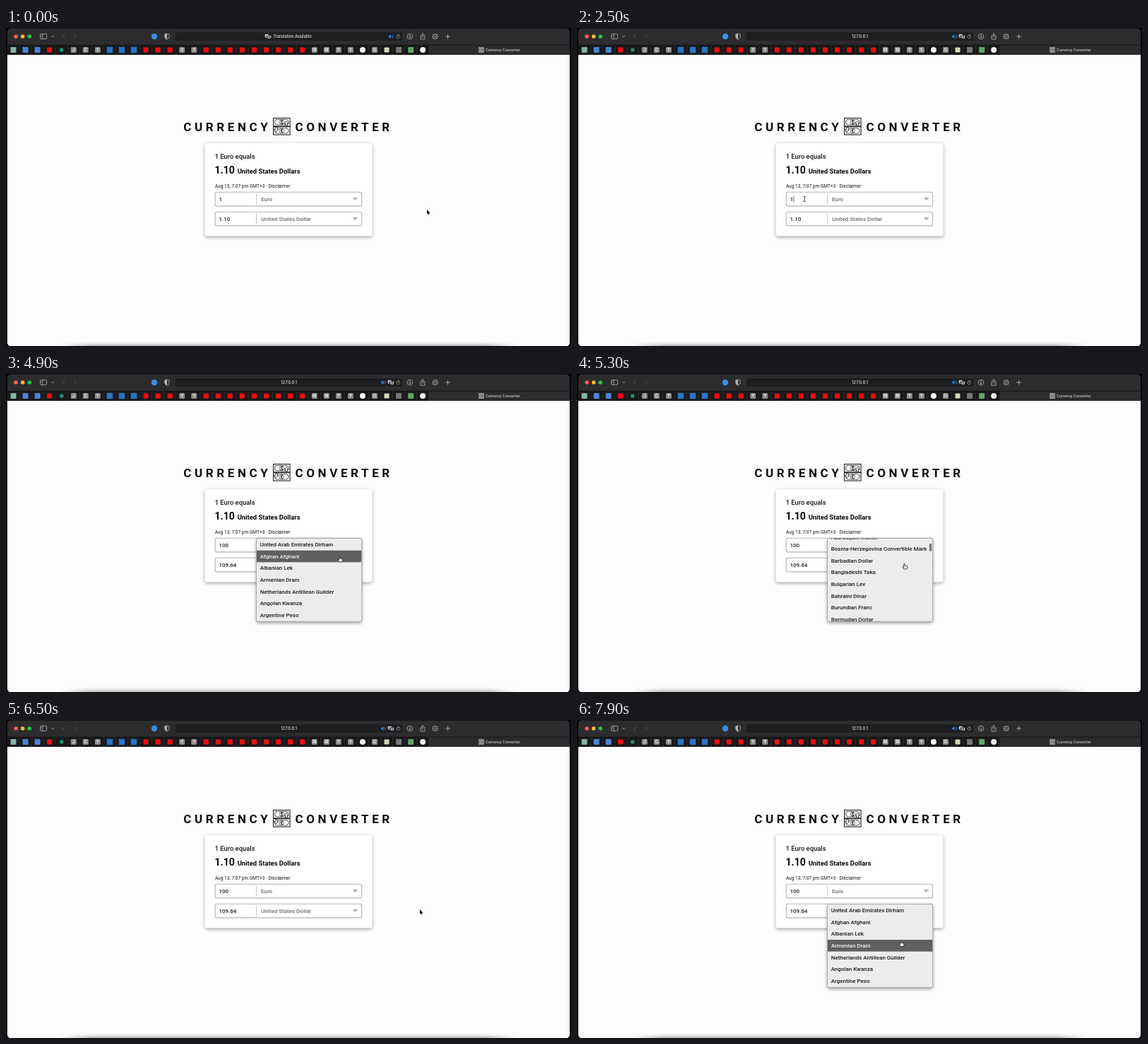
These frames come from a looping animation (800 px wide and 450 px high, 8000 ms). An HTML page with a canvas:

```html
<!DOCTYPE html>
<html lang="en">
<head>
<meta charset="utf-8">
<title>Currency Converter</title>
<style>
html, body { margin: 0; width: 100%; height: 100%; overflow: hidden; background: #000; }
canvas { display: block; width: 800px; height: 450px; }
</style>
</head>
<body>
<canvas id="stage"></canvas>
<script>
const canvas = document.getElementById('stage');
const ctx = canvas.getContext('2d');
const ratio = window.devicePixelRatio || 1;
canvas.width = 800 * ratio;
canvas.height = 450 * ratio;

const LOOP = 8000, STEP = 100, ROW = 16.6;
const WEB = 'Roboto, sans-serif', UI = 'Inter, sans-serif';

const CURRENCIES = ('United Arab Emirates Dirham,Afghan Afghani,Albanian Lek,Armenian Dram,' +
  'Netherlands Antillean Guilder,Angolan Kwanza,Argentine Peso,Australian Dollar,Aruban Florin,' +
  'Azerbaijani Manat,Bosnia-Herzegovina Convertible Mark,Barbadian Dollar,Bangladeshi Taka,' +
  'Bulgarian Lev,Bahraini Dinar,Burundian Franc,Bermudan Dollar,Brunei Dollar,Bolivian Boliviano,' +
  'Brazilian Real,Bahamian Dollar,Bitcoin,Bhutanese Ngultrum,Botswanan Pula,Belarusian Ruble,' +
  'Belize Dollar,Canadian Dollar,Congolese Franc,Swiss Franc,Chilean Unit of Account (UF),' +
  'Chilean Peso,Chinese Yuan,Colombian Peso,Costa Rican Colón,Cuban Convertible Peso,Cuban Peso,' +
  'Cape Verdean Escudo,Czech Koruna,Djiboutian Franc,Danish Krone,Dominican Peso').split(',');

// One character per pinned tab; capitals are letter icons
const TABS = 'tbbreJCYlllrrrYYrrrrrrrrrMMYYwGcogw';
const TAB_ICONS = {
  t: ['#7fb5a5', 8], b: ['#4b83d8', 8], r: ['#f20d0d', 7], e: ['#238f78', 5], l: ['#2a73c4', 8.5],
  w: ['#f4f4f4', 8, true], c: ['#d9d3bd', 7], o: ['#77777a', 8], g: ['#5fa566', 8]
};

// Pointer tip: time, x, y
const PATH = [[1400, 596, 257], [2100, 322, 242], [3800, 322, 242], [4300, 476, 241], [4700, 475, 243],
  [4900, 472, 258.5], [5200, 463.5, 268.5], [5800, 463.5, 268.5], [6100, 581, 267], [6200, 590, 268],
  [6400, 586, 268], [6700, 586, 268], [7050, 500, 270], [7250, 470, 268], [7500, 469, 270], [7900, 458.5, 313]];
const SCROLL = [[5100, 0], [5300, 160], [5500, 350], [5700, 481.8], [5850, 500]];

const smooth = p => p * p * (3 - 2 * p);
function along(keys, t, ease = p => p) {
  if (t <= keys[0][0]) return keys[0].slice(1);
  for (let i = 1; i < keys.length; i++) {
    const a = keys[i - 1], b = keys[i];
    if (t <= b[0]) {
      const p = ease((t - a[0]) / (b[0] - a[0]));
      return a.slice(1).map((v, k) => v + (b[k + 1] - v) * p);
    }
  }
  return keys[keys.length - 1].slice(1);
}

function text(str, x, y, size, weight, color, family = WEB, align = 'left') {
  ctx.font = `${weight} ${size}px ${family}`;
  ctx.fillStyle = color;
  ctx.textAlign = align;
  ctx.fillText(str, x, y);
}
function box(x, y, w, h, r, fill, stroke, width = 1) {
  ctx.beginPath();
  ctx.roundRect(x, y, w, h, r);
  if (fill) { ctx.fillStyle = fill; ctx.fill(); }
  if (stroke) { ctx.strokeStyle = stroke; ctx.lineWidth = width; ctx.stroke(); }
}
function disc(x, y, r, fill, stroke, width = 0.8) {
  box(x - r, y - r, 2 * r, 2 * r, r, fill, stroke, width);
}
function path(d, x, y, stroke, width, fill) {
  ctx.save();
  ctx.translate(x, y);
  const p = new Path2D(d);
  if (fill) { ctx.fillStyle = fill; ctx.fill(p); }
  if (stroke) {
    ctx.strokeStyle = stroke;
    ctx.lineWidth = width;
    ctx.lineCap = ctx.lineJoin = 'round';
    ctx.stroke(p);
  }
  ctx.restore();
}
function shadowed(blur, dy, color, draw) {
  ctx.save();
  ctx.shadowColor = color;
  ctx.shadowBlur = blur * ratio;
  ctx.shadowOffsetY = dy * ratio;
  draw();
  ctx.restore();
}

function speaker(x) {
  path('M-3.4-1.2H-2L0-3V3L-2 1.2H-3.4Z', x, 12, null, 0, '#2f7fd0');
  path('M1.3-1.3Q2.2 0 1.3 1.3M2.6-2.3Q4.2 0 2.6 2.3', x, 12, '#2f7fd0', 0.7);
}
function translateIcon(x) {
  box(x - 4.3, 8.8, 5, 4.6, 1.2, '#d5d5d7');
  box(x - 0.6, 10.4, 5, 4.6, 1.2, '#d5d5d7', '#1e1e20', 0.6);
  text('A', x - 1.9, 12.6, 4, 600, '#1e1e20', UI, 'center');
  path('M-1.1-.7H1.1M0-1.3V-.7M.8-.6Q.3.9-1.1 1.3M-.8-.6Q0 1 1.1 1.3', x + 1.9, 12.7, '#1e1e20', 0.5);
}

function addressBar(t) {
  box(239, 5.5, 323, 13, 3, '#1e1e20', '#38383a', 0.6);
  const shown = Math.min(1, t / 300);
  ctx.globalAlpha = 1 - shown;
  translateIcon(371);
  text('Translation Available', 378.3, 14, 5.5, 500, '#e4e4e6', UI);
  speaker(545);
  ctx.globalAlpha = shown;
  text('127.0.0.1', 400.5, 14.1, 5.8, 500, '#e4e4e6', UI, 'center');
  speaker(534.5);
  translateIcon(545);
  ctx.globalAlpha = 1;
  path('M1.9-1.3A2.3 2.3 0 1 0 2.3.4M.1-3.6L1.7-2L.1-.7', 555.3, 12.3, '#b9b9bc', 0.7);
}

function toolbar(t) {
  ctx.fillStyle = '#2c2c2e';
  ctx.fillRect(0, 0, 800, 38);
  ['#ff5f57', '#febc2e', '#28c840'].forEach((c, i) => disc(14 + i * 9.6, 12, 2.8, c));
  const grey = '#b4b4b7';
  box(48.6, 8.4, 9, 7, 1.4, null, grey, 0.8);
  path('M0-3.5V3.5M-1.9-1.8H-1.3M-1.9-.3H-1.3', 52, 12, grey, 0.7);
  path('M-1.5-.8L0 .8L1.5-.8', 66, 12, grey, 0.8);
  path('M1.2-3L-1.5 0L1.2 3', 82, 12, '#555558', 0.9);
  path('M-1.2-3L1.5 0L-1.2 3', 98, 12, '#555558', 0.9);
  disc(210, 12, 4.2, '#3b8de6');
  const shield = 'M0-4L3.2-2.9V.3Q3 2.9 0 4.2Q-3 2.9-3.2.3V-2.9Z';
  path(shield, 228, 12, grey, 0.8);
  path('M0-4V4.2Q-3 2.9-3.2.3V-2.9Z', 228, 12, null, 0, grey);
  addressBar(t);
  disc(572, 12, 3.8, null, grey, 0.8);
  path('M0-2V1.8M-1.4.5L0 1.9L1.4.5', 572, 12, grey, 0.8);
  path('M-1.4-1.2H-3V4H3V-1.2H1.4M0 1.3V-4.2M-1.5-2.8L0-4.3L1.5-2.8', 590, 12, grey, 0.8);
  disc(607.7, 12, 3.3, null, grey, 0.8);
  disc(607.7, 12, 1.3, null, grey, 0.7);
  for (let i = 0; i < 8; i++) {
    const a = i * Math.PI / 4;
    disc(607.7 + 3.8 * Math.cos(a), 12 + 3.8 * Math.sin(a), 0.55, grey);
  }
  path('M-3 0H3M0-3V3', 625.6, 12, grey, 0.9);
}

function tabStrip() {
  ctx.fillStyle = '#19191a';
  ctx.fillRect(0, 24, 599, 14);
  ctx.fillStyle = '#0c0c0d';
  ctx.fillRect(0, 23.8, 800, 0.6);
  [...TABS].forEach((key, i) => {
    const x = 10.5 + i * 17.05, y = 31;
    ctx.fillStyle = '#343436';
    ctx.fillRect(x + 8.3, 24.5, 0.6, 13.5);
    const icon = TAB_ICONS[key];
    if (icon) {
      const [color, size, round] = icon;
      box(x - size / 2, y - size / 2, size, size, round ? size / 2 : 0.8, color);
    } else {
      box(x - 4, y - 4, 8, 8, 1.5, '#8b8b8e');
      text(key, x, y + 2.1, 5.8, 600, '#f5f5f5', UI, 'center');
    }
  });
  box(669, 27, 8, 8, 1, '#a9a9ab');
  path('M-3-2.7H3V-.4H-3ZM-3 .5H3V2.8H-3Z', 673, 31, '#48484a', 0.6);
  text('Currency Converter', 679, 33, 5.15, 500, '#dededf', UI);
}

function note(x, y, sign, arrowX, dir) {
  ctx.strokeStyle = '#111';
  ctx.lineWidth = 1;
  ctx.strokeRect(x, y, 23.6, 11.4);
  path('M4 2H19.6Q19.6 4 21.6 4V7.4Q19.6 7.4 19.6 9.4H4Q4 7.4 2 7.4V4Q4 4 4 2Z', x, y, '#222', 0.7);
  disc(x + 11.8, y + 5.7, 3.3, '#fdfdfd', '#222', 0.6);
  text(sign, x + 11.8, y + 8, 6.6, 700, '#111', WEB, 'center');
  ctx.save();
  ctx.translate(arrowX, y + 5.7 + dir * 2);
  ctx.scale(1, dir);
  path('M0-3.2L3-.2H1.4V3H-1.4V-.2H-3Z', 0, 0, '#111', 0.8, '#fdfdfd');
  ctx.restore();
}

function field(y, value, name) {
  box(296.2, y, 207.4, 19.6, 2.2, '#fff', '#b3b3b7', 1.1);
  ctx.fillStyle = '#c6c6c9';
  ctx.fillRect(354, y + 2, 1, 15.6);
  text(value, 301.4, y + 12.7, 8, 500, '#202022');
  text(name, 361, y + 12.7, 8, 500, '#6d6d72');
  path('M-4-2H4L0 2Z', 494.7, y + 9.8, null, 0, '#b0b0b3');
}

function page(t) {
  ctx.fillStyle = '#fdfdfd';
  ctx.fillRect(0, 38, 800, 412);
  ctx.letterSpacing = '4.6px';
  text('CURRENCY', 251.3, 146.3, 17, 700, '#0b0b0b');
  text('CONVERTER', 409.5, 146.3, 17, 700, '#0b0b0b');
  ctx.letterSpacing = '0px';
  note(378.5, 127.5, '$', 397.2, 1);
  note(378.5, 139.7, '€', 382.6, -1);

  shadowed(5, 1.8, 'rgba(0,0,0,.36)', () => box(281.5, 163, 237, 131.5, 3.5, '#fff'));
  text('1 Euro equals', 295.7, 185.2, 9.4, 500, '#151515');
  text('1.10', 295.5, 205.8, 14.1, 700, '#080808');
  text('United States Dollars', 327.7, 205.8, 9.4, 700, '#080808');
  text('Aug 13, 7:07 pm GMT+3 · Disclaimer', 295.8, 225.6, 6.6, 400, '#151515');

  const typed = t < 2700 ? 0 : t < 3000 ? 1 : 2;
  const amount = ['1', '10', '100'][typed];
  field(232.3, amount, 'Euro');
  field(260.3, ['1.10', '10.96', '109.64'][typed], 'United States Dollar');
  if (t >= 2200 && t < 4400 && (t - 2100) % 1000 < 500) {
    ctx.fillStyle = '#333';
    ctx.fillRect(302 + 4.55 * amount.length, 237.5, 0.7, 9);
  }
}

function dropdown(top, scroll, active, bar) {
  const h = 7 * ROW + 1.6;
  shadowed(5, 2, 'rgba(0,0,0,.42)', () => box(354.5, top, 149.2, h, 2.5, '#ececec'));
  ctx.save();
  ctx.beginPath();
  ctx.roundRect(354.5, top, 149.2, h, 2.5);
  ctx.clip();
  const first = Math.floor(scroll / ROW);
  for (let i = first; i < first + 8 && i < CURRENCIES.length; i++) {
    const y = top + 0.6 + i * ROW - scroll;
    if (i === active) {
      ctx.fillStyle = '#606060';
      ctx.fillRect(354.5, y, 150, ROW);
    }
    text(CURRENCIES[i], 359.7, y + 11, 8, 500, i === active ? '#f4f4f4' : '#1c1c1c');
  }
  if (bar) box(498.8, top + 0.6 + scroll * 0.0415, 3.4, 11.2, 1.7, '#7c7c7c');
  ctx.restore();
  box(354.5, top, 149.2, h, 2.5, null, '#a5a5a7', 0.9);
}

function pointer(x, y, kind) {
  if (kind === 'arrow') {
    path('M0 0V6.6L1.5 5.3L2.5 7.6L3.6 7.1L2.6 4.9H4.6Z', x, y, '#fff', 1.1, '#000');
    path('M0 0V6.6L1.5 5.3L2.5 7.6L3.6 7.1L2.6 4.9H4.6Z', x, y, null, 0, '#000');
  } else if (kind === 'hand') {
    path('M-.7 4V.4Q0-.6.7.4V2.7Q1.5 2 2 2.9Q2.8 2.3 3.3 3.2Q4.3 2.9 4.4 4V5.5L3.6 7.5H-.4L-2.5 4.5Q-2.2 3.3-.7 4.4Z',
      x, y, '#111', 0.8, '#fff');
  } else {
    path('M-1.3-3.6Q0-3.6 0-2.8Q0-3.6 1.3-3.6M0-2.8V2.8M-1.3 3.6Q0 3.6 0 2.8Q0 3.6 1.3 3.6', x, y, '#222', 0.8);
  }
}

function dockShade() {
  for (let i = 0; i < 8; i++) {
    const g = ctx.createLinearGradient(76, 0, 724, 0), dark = `rgba(0,0,0,${0.004 * (i + 1) ** 2})`;
    g.addColorStop(0, 'rgba(0,0,0,0)');
    g.addColorStop(0.07, dark);
    g.addColorStop(0.93, dark);
    g.addColorStop(1, 'rgba(0,0,0,0)');
    ctx.fillStyle = g;
    ctx.fillRect(76, 442 + i, 648, 1);
  }
}

function draw(t) {
  ctx.setTransform(ratio, 0, 0, ratio, 0, 0);
  ctx.fillStyle = '#000';
  ctx.fillRect(0, 0, 800, 450);
  ctx.save();
  ctx.beginPath();
  ctx.roundRect(1.8, 0.5, 796.4, 449.8, 5);
  ctx.clip();
  toolbar(t);
  tabStrip();
  page(t);
  dockShade();
  ctx.restore();

  const [x, y] = along(PATH, t, smooth);
  const overList = x > 354 && x < 504;
  const openA = t >= 4500 && t < 6300, openB = t >= 7500;
  const hover = top => Math.floor((along(PATH, t - 100, smooth)[1] - top) / ROW);
  if (openA) dropdown(232.5, along(SCROLL, t)[0], t < 5200 ? Math.max(0, hover(232.5)) : -1, t > 5100);
  if (openB) dropdown(260.6, 0, Math.max(0, t < 7900 ? hover(260.6) : 3), false);

  if (t >= 2700 && t < 3800) return;
  const inField = y > 232 && y < 252 || y > 260 && y < 280;
  const kind = overList && (inField || openA || openB) ? 'hand' : inField && x > 296 && x < 354 ? 'beam' : 'arrow';
  pointer(x, y, kind);
}

const start = performance.now();
function tick() {
  const t = (performance.now() - start) % LOOP;
  draw(Math.floor(t / STEP) * STEP);
  requestAnimationFrame(tick);
}
tick();
</script>
</body>
</html>
```
